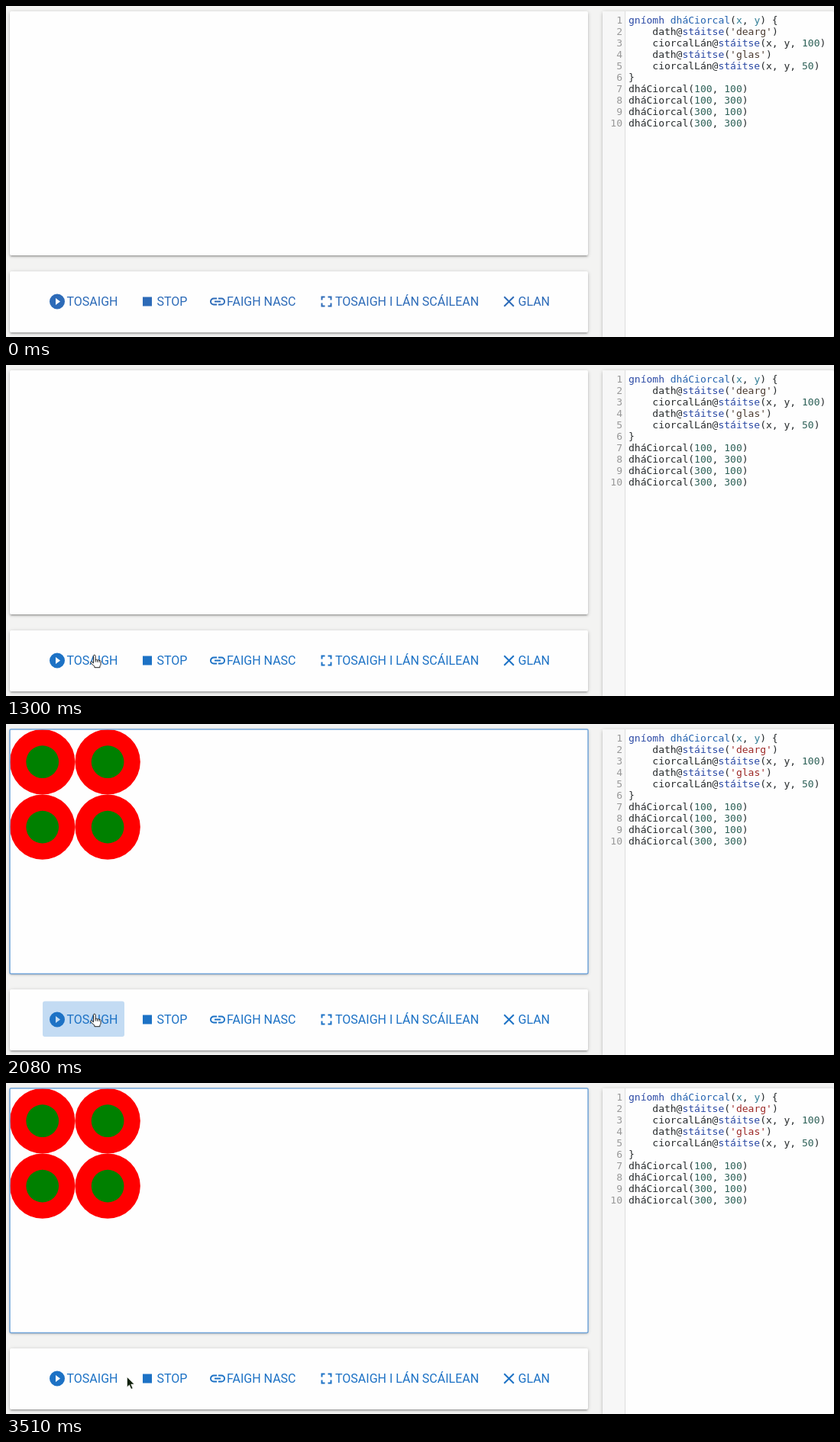
An HTML page that plays this animation: 1084x434 px, repeating every 4160 ms.

```html
<!DOCTYPE html>
<html lang="ga">
<head>
<meta charset="utf-8">
<style>
html, body { margin: 0; width: 100%; height: 100%; overflow: hidden; background: #f3f3f2; }
div, pre, svg { position: absolute; margin: 0; }
#stage { inset: 0; overflow: hidden; contain: strict; }
.card { left: 5px; width: 757px; background: #fefefe; border-radius: 2px;
  box-shadow: 0 1px 5px #0003, 0 2px 2px #00000024, 0 3px 1px -2px #0000001f; }
#editor { left: 781px; right: 0; top: 7px; bottom: 0; width: auto; }
#gutter { left: 0; top: 0; bottom: 0; width: 29px; background: #f7f7f7; border-right: 1px solid #ddd; }
pre { top: 11px; font: 13px/15px "DejaVu Sans Mono", monospace; color: #262a2c; }
#nums { left: 781px; width: 26px; text-align: right; color: #999; }
#code { left: 815px; }
i { font-style: normal; }
.key { color: #2a48a4; }
.def { color: #2462b0; }
.arg { color: #2f7d95; }
.num { color: #2f6259; }
.str { color: var(--str); }
svg { left: 0; top: 0; }
text { font: 16px Roboto, sans-serif; }
</style>
</head>
<body>
<div id="stage">
  <div class="card" style="top:7px;height:320px"></div>
  <div class="card" style="top:348px;height:80px"></div>
  <div class="card" id="editor"><div id="gutter"></div></div>
  <pre id="nums"></pre>
  <pre id="code"></pre>
  <svg width="1084" height="434">
    <clipPath id="button"><rect x="48" y="363.5" width="107" height="46.5" rx="3"/></clipPath>
    <g id="drawing">
      <g id="rings"></g>
      <rect x="5" y="7" width="757" height="320.5" rx="1.5" fill="none" stroke="#73a6da" stroke-width="1.5"/>
    </g>
    <g clip-path="url(#button)"><circle id="ripple" cy="387" fill="#1976d2"/></g>
    <g id="buttons"></g>
    <g id="hand" fill="#fefefe" stroke="#222" stroke-linejoin="round">
      <path d="M-1.3 10.5V1.5a1.3 1.3 0 0 1 2.6 0v5q1.2-.8 2.4.4q1.3-.7 2.4.5q1.6-.5 2.2 1v3.5q0 2-1.2 3v1.8h-7v-1.6L-4.8 10.8q-1-1.6.2-2q1.2-.2 3.3 2.2z"/>
      <path d="M1.3 6.5v3M3.7 6.9v2.8M6.1 7.4v2.5" fill="none"/>
    </g>
    <path id="arrow" d="M0 0v13.2l3-2.8 2.3 5.4 2.2-.9-2.3-5.3h4.2z" fill="#10200c" stroke="#fefefe" stroke-width=".6"/>
  </svg>
</div>
<script>
const STEP = 130, LOOP = 4160;
const $ = id => document.getElementById(id);
const progress = (t, from, to) => Math.min(1, Math.max(0, (t - from) / (to - from)));
const mix = (a, b, k) => a + (b - a) * k;

const body = `    dath@stáitse('dearg')
    ciorcalLán@stáitse(x, y, 100)
    dath@stáitse('glas')
    ciorcalLán@stáitse(x, y, 50)
}
dháCiorcal(100, 100)
dháCiorcal(100, 300)
dháCiorcal(300, 100)
dháCiorcal(300, 300)`;
const paint = s => `<i class="${s[0] === "'" ? 'str' : s > '9' ? 'key' : 'num'}">${s}</i>`;
$('code').innerHTML = '<i class="key">gníomh</i> <i class="def">dháCiorcal</i>(<i class="arg">x</i>, <i class="arg">y</i>) {\n' +
  body.replace(/'\w+'|\d+|stáitse/g, paint);
$('nums').textContent = Array.from({ length: 10 }, (_, i) => i + 1).join('\n');

// icon x, label x, label, icon outline on a 24px grid
const buttons = [
  [55, 79.5, 'TOSAIGH', 'M12 2a10 10 0 0 0 0 20 10 10 0 0 0 0-20zm-2 14.5v-9l6 4.5z'],
  [173, 197.5, 'STOP', 'M6 6h12v12H6z'],
  [265, 289, 'FAIGH NASC', 'M3.9 12c0-1.7 1.4-3.1 3.1-3.1h4V7H7a5 5 0 0 0 0 10h4v-1.9H7c-1.7 0-3.1-1.4-3.1-3.1zM8 13h8v-2H8zm9-6h-4v1.9h4a3.1 3.1 0 0 1 0 6.2h-4V17h4a5 5 0 0 0 0-10z'],
  [407.5, 431, 'TOSAIGH I LÁN SCÁILEAN', 'M7 14H5v5h5v-2H7zm-2-4h2V7h3V5H5zm12 7h-3v2h5v-5h-2zM14 5v2h3v3h2V5z'],
  [646.5, 670.5, 'GLAN', 'M19 6.4L17.6 5 12 10.6 6.4 5 5 6.4l5.6 5.6L5 17.6 6.4 19l5.6-5.6 5.6 5.6 1.4-1.4-5.6-5.6z']
];
$('buttons').innerHTML = buttons.map(([ix, tx, label, d]) =>
  `<path transform="translate(${ix} 375.5)" d="${d}"/><text x="${tx}" y="393">${label}</text>`).join('');

const ZOOM = 0.427;
const disc = (x, y, r, fill) =>
  `<circle cx="${5 + x * ZOOM}" cy="${7 + y * ZOOM}" r="${r * ZOOM}" fill="${fill}"/>`;
for (const x of [100, 300]) for (const y of [100, 300])
  $('rings').innerHTML += disc(x, y, 100, '#f00') + disc(x, y, 50, '#008000');

const show = (id, on) => $(id).style.display = on ? '' : 'none';

function drawPointer(t) {
  const arrive = progress(t, 1040, 1300), leave = progress(t, 3120, 3510);
  const glide = leave * leave * (3 - 2 * leave);
  const x = mix(mix(118.8, 115.8, arrive), 158.5, glide);
  const y = mix(mix(368.5, 380, arrive), 385.5, glide);
  show('hand', t >= 1040 && leave < 1);
  show('arrow', leave === 1);
  for (const id of ['hand', 'arrow']) $(id).setAttribute('transform', `translate(${x} ${y})`);
}

// grows from the pointer to the button's centre, then fades
function drawRipple(t) {
  const grow = 1 - (1 - progress(t, 1780, 2050)) ** 3;
  const ripple = $('ripple');
  ripple.setAttribute('cx', mix(117, 101.5, grow));
  ripple.setAttribute('r', mix(12, 58.3, grow));
  ripple.setAttribute('opacity', t < 1820 ? 0 : 0.26 * (1 - progress(t, 2080, 2340)));
}

function draw() {
  const t = Math.floor(performance.now() % LOOP / STEP) * STEP;
  const drawn = t >= 2080;
  show('drawing', drawn);
  $('stage').style.setProperty('--str', drawn ? '#9c2826' : '#4a3a30');
  $('buttons').setAttribute('fill', t < STEP ? '#2d6bb8' : '#1d72c5');
  drawRipple(t);
  drawPointer(t);
  requestAnimationFrame(draw);
}
draw();
</script>
</body>
</html>
```
